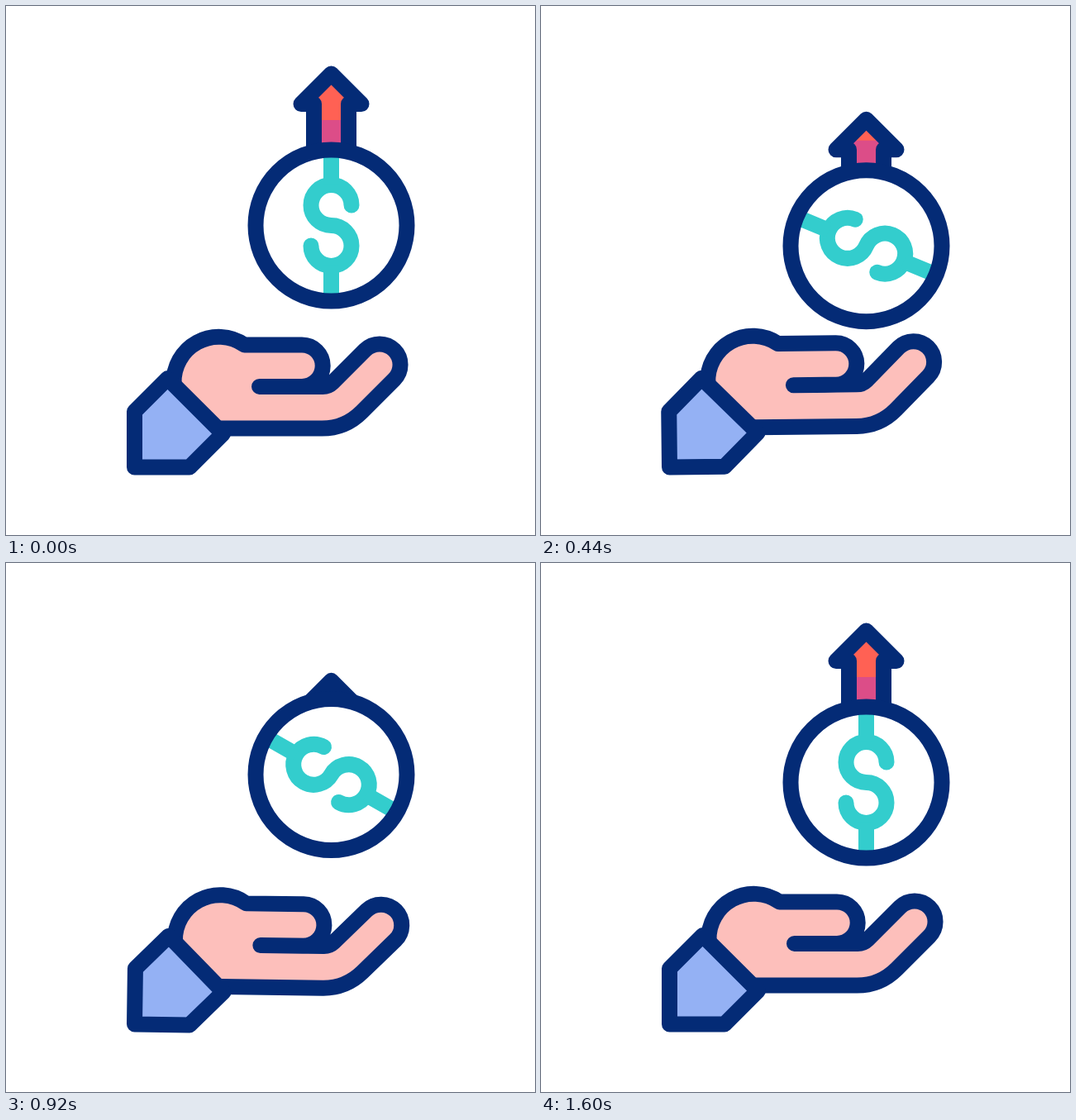
An HTML page with a canvas that plays this animation: 640 by 640 pixels, repeating every 2080 ms.

```html
<!DOCTYPE html>
<html lang="en">
<head>
<meta charset="utf-8">
<title>Coin toss</title>
<style>
  html, body { margin: 0; width: 100%; height: 100%; overflow: hidden; background: #fff; }
  canvas { display: block; width: 640px; height: 640px; }
</style>
</head>
<body>
<canvas id="stage" width="640" height="640"></canvas>
<script>
const ctx = document.getElementById('stage').getContext('2d');
const LOOP = 2080, STEP = 40, LINE = 19;
const NAVY = '#042b76', SKIN = '#fdbfbb', SLEEVE = '#94b1f4',
      TEAL = '#33cdcd', RED = '#ff6154', SHADE = '#dc4d88';
const COIN = { x: 393.5, y: 265.5, r: 91.5 };
const WRIST = { x: 155.5, y: 558 };

const hand = new Path2D(
  'M203 457A54.5 54.5 0 0 1 288.5 410H358A25.2 25.2 0 0 1 358 460.4H306.5H383' +
  'A17 17 0 0 0 395 455.6L434.3 416.3A25 25 0 0 1 469.7 451.7L430.2 491.2' +
  'A67.6 67.6 0 0 1 382.4 511H260');
const sleeve = new Path2D('M155.5 558V490.6L195.5 450.6L262.5 517.5L222 558Z');
const arrow = new Path2D('M372.5 225V118.5H357L393.5 82L430 118.5H414.5V225');
const dollar = new Path2D(
  'M24.5 -24.5A24.5 24.5 0 1 0 0 0A24.5 24.5 0 1 1 -24.5 24.5');
const bars = new Path2D('M0 -91V-49M0 49V91');

// Tracks of [time, value], eased between neighbours
const coinTrack = [[0, 0], [280, 52.8], [680, -27], [1080, 0]];
const handTrack = [[0, 0], [280, 3], [560, -3], [840, 1], [1120, 0]];
const arrowTrack = [[0, 0], [280, 0], [560, 91], [760, 91], [1200, -11], [1600, 0]];

const smooth = s => s * s * (3 - 2 * s);

function sample(track, t) {
  const i = track.findIndex(key => key[0] > t);
  if (i < 0) return track[track.length - 1][1];
  const [t0, v0] = track[i - 1], [t1, v1] = track[i];
  return v0 + (v1 - v0) * smooth((t - t0) / (t1 - t0));
}

// Cubic Bézier ease (x1, 0, x2, 1)
function bezier(x, x1, x2) {
  let lo = 0, hi = 1;
  for (let n = 0; n < 30; n++) {
    const s = (lo + hi) / 2, r = 1 - s;
    if (3 * s * r * r * x1 + 3 * s * s * r * x2 + s * s * s < x) lo = s;
    else hi = s;
  }
  return smooth(lo);
}

function outlined(path, fill) {
  ctx.fillStyle = fill;
  ctx.fill(path);
  ctx.strokeStyle = NAVY;
  ctx.stroke(path);
}

function group(draw) {
  ctx.save();
  draw();
  ctx.restore();
}

function drawArrow(rise, drop) {
  ctx.translate(0, rise);
  group(() => {
    ctx.clip(arrow);
    ctx.fillStyle = RED;
    ctx.fillRect(340, 70, 110, 160);
    ctx.fillStyle = SHADE;
    ctx.fillRect(340, 138 + drop - rise, 110, 200);
  });
  ctx.strokeStyle = NAVY;
  ctx.stroke(arrow);
}

function drawCoin(drop, turn) {
  const ring = new Path2D();
  ring.arc(0, 0, COIN.r, 0, 2 * Math.PI);
  ctx.translate(COIN.x, COIN.y + drop);
  ctx.fillStyle = '#fff';
  ctx.fill(ring);
  group(() => {
    ctx.rotate(turn);
    ctx.strokeStyle = TEAL;
    ctx.stroke(dollar);
    ctx.lineCap = 'butt';
    ctx.stroke(bars);
  });
  ctx.strokeStyle = NAVY;
  ctx.stroke(ring);
}

function drawHand(degrees) {
  ctx.translate(WRIST.x, WRIST.y);
  ctx.rotate(degrees * Math.PI / 180);
  ctx.translate(-WRIST.x, -WRIST.y);
  outlined(hand, SKIN);
  outlined(sleeve, SLEEVE);
}

function render(now) {
  const t = Math.floor((now % LOOP) / STEP) * STEP;
  const drop = sample(coinTrack, t);
  const turn = 2 * Math.PI * bezier(Math.min(t / 1520, 1), 0.333, 0.35);
  ctx.fillStyle = '#fff';
  ctx.fillRect(0, 0, 640, 640);
  ctx.lineWidth = LINE;
  ctx.lineCap = ctx.lineJoin = 'round';
  group(() => drawHand(sample(handTrack, t)));
  group(() => drawArrow(sample(arrowTrack, t), drop));
  group(() => drawCoin(drop, turn));
}

let start;
function tick(now) {
  start ??= now;
  render(now - start);
  requestAnimationFrame(tick);
}
render(0);
requestAnimationFrame(tick);
</script>
</body>
</html>
```
